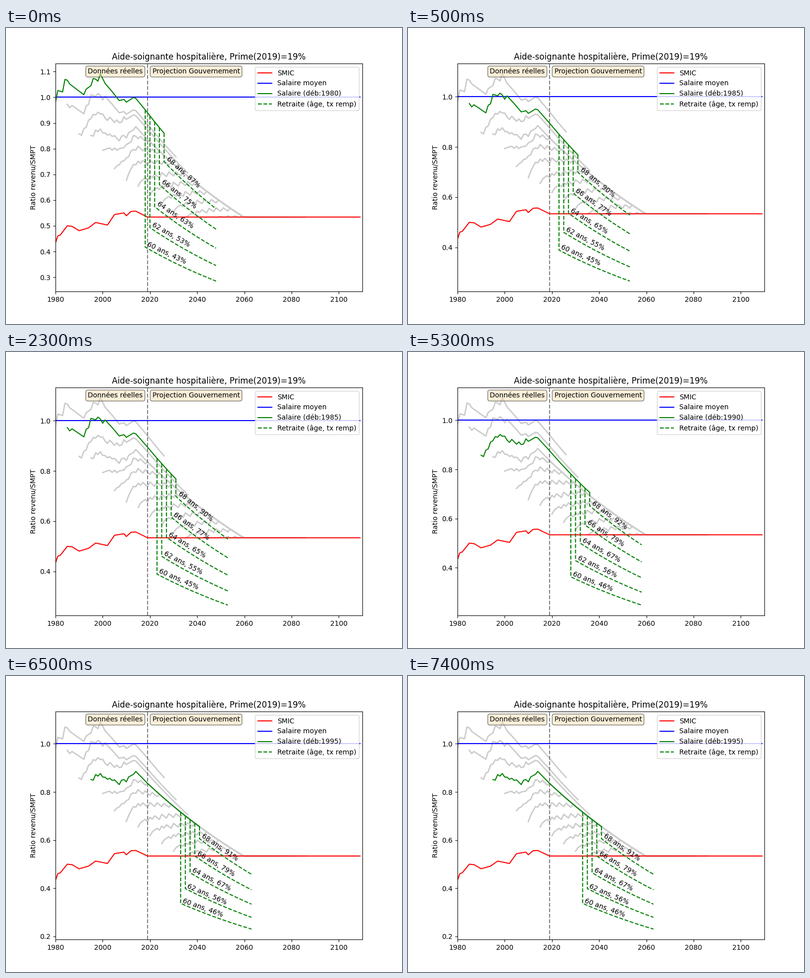
These frames come from a looping animation (800x600 px, 8000 ms). A matplotlib script:

```python
import numpy as np
import matplotlib.pyplot as plt
from matplotlib.animation import FuncAnimation

NOW = 2019          # last year of real data
FLOOR = 0.534       # projected minimum wage
DRIFT = 0.0127      # yearly erosion of frozen incomes
CAREER = 46
HIRED_AT = 22
AGES = (60, 62, 64, 66, 68)
AGE_GAIN = (1, 1.212, 1.449, 1.708, 1.988)
COHORTS = range(1980, 2045, 5)
YEARS = np.arange(1980, 2110)

# Turning points of the two indices relative to the mean wage
MIN_WAGE = ((1980, 0.434), (1981, 0.461), (1982, 0.464), (1985, 0.500),
            (1987, 0.498), (1990, 0.481), (1994, 0.492), (1997, 0.513),
            (2002, 0.503), (2005, 0.544), (2009, 0.550), (2010, 0.539),
            (2012, 0.556), (2014, 0.557), (NOW, FLOOR))
TOP_WAGE = ((1980, 1.170), (1985, 1.153), (1986, 1.137), (1992, 1.092),
            (1995, 1.113), (1997, 1.107), (1999, 1.0911), (2001, 1.054),
            (2004, 1.022), (2007, 0.987), (2009, 0.992), (2010, 0.981),
            (2013, 0.999), (2014, 0.996), (NOW, 0.940))

# Pay grades: (seniority, share of the top wage)
FIRST_GRADES = {
    1980: ((0, 0.839), (1, 0.880), (4, 0.925), (13, 0.939), (16, 0.967),
           (19, 1.000)),
    1985: ((0, 0.844), (2, 0.857), (8, 0.879), (10, 0.907), (13, 0.923),
           (16, 0.952))}
OLD_STEPS = (0, 2, 4, 6, 8, 10, 13, 16, 19)
NEW_STEPS = (0, 1, 2, 3, 5, 7, 10, 13, 16, 19)

# Start year, lowest final pension, replacement rates by age
SCENES = [(1980, 0.2850, (43, 53, 63, 75, 87)),
          (1985, 0.2660, (45, 55, 65, 77, 90)),
          (1990, 0.2480, (46, 56, 67, 79, 92)),
          (1995, 0.2305, (46, 56, 67, 79, 91))]


def follow(points, years):
    return np.interp(years, *zip(*points))


def grades(start):
    """Promotion years and the share of the top wage they give."""
    if start in FIRST_GRADES:
        return np.array(FIRST_GRADES[start]).T
    entry = np.interp(start, (1990, 1995, 2015), (0.775, 0.765, 0.665))
    top = np.interp(start, (1990, 1995), (0.932, 0.889))
    steps = np.array(OLD_STEPS if start < 2000 else NEW_STEPS)
    return steps, entry + (top - entry) * (steps / 19) ** 0.75


def wages(start):
    seniority = np.arange(CAREER + 1)
    years = start + seniority
    steps, shares = grades(start)
    share = shares[np.searchsorted(steps, seniority, side="right") - 1]
    rate = DRIFT if start < 1995 else 0.011
    erosion = np.exp(-rate * np.maximum(years - NOW, 0))
    return years, np.maximum(follow(TOP_WAGE, years) * share * erosion, FLOOR)


CURVES = {c: wages(c) for c in COHORTS}

fig, ax = plt.subplots(figsize=(8, 6), dpi=100)


def note(x, text, align):
    ax.text(x, 0.98, text, transform=ax.get_xaxis_transform(),
            ha=align, va="top",
            bbox=dict(boxstyle="round", facecolor="wheat", alpha=0.5))


def pension(start, age, final):
    """Dashed drop from the wage, then slow erosion until age 90."""
    first, last = start + age - HIRED_AT, start + 90 - HIRED_AT
    t = np.arange(first, last + 1)
    level = final * np.exp(DRIFT * (last - t))
    wage = CURVES[start][1][first - start]
    ax.plot(np.r_[first, t], np.r_[wage, level], "--", color="green",
            label="Retraite (âge, tx remp)" if age == 60 else None)
    return t, level


def tag(t, level, text):
    (x0, y0), (x1, y1) = ax.transData.transform(
        [(t[0], level[0]), (t[-1], level[-1])])
    ax.text(t[0] + 0.35, level[0] + 0.025, text, ha="left", va="top",
            rotation=np.degrees(np.arctan2(y1 - y0, x1 - x0)))


def draw(i):
    start, lowest, rates = SCENES[(i + 5) // 6]
    ax.clear()
    ax.set_xlim(1980, 2110)
    for c in COHORTS:
        if c != start:
            ax.plot(*CURVES[c], color="0.8", linewidth=2)
    ax.axvline(NOW, color="gray", linestyle="--")
    ax.plot(YEARS, follow(MIN_WAGE, YEARS), color="red", label="SMIC")
    ax.plot(YEARS, np.ones(len(YEARS)), color="blue", label="Salaire moyen")
    ax.plot(*CURVES[start], color="green", label=f"Salaire (déb:{start})")
    paths = [pension(start, age, lowest * gain)
             for age, gain in zip(AGES, AGE_GAIN)]

    ax.get_ylim()  # settle the scale before measuring slopes
    for (t, level), age, rate in zip(paths, AGES, rates):
        tag(t, level, f"{age} ans, {rate}%")
    note(2017, "Données réelles", "right")
    note(2021, "Projection Gouvernement", "left")
    ax.set_title("Aide-soignante hospitalière, Prime(2019)=19%")
    ax.set_ylabel("Ratio revenu/SMPT")
    ax.legend(loc="upper right")
    return []


anim = FuncAnimation(fig, draw, frames=16, interval=500, repeat=True,
                     repeat_delay=0, init_func=lambda: [])
plt.show()
```
